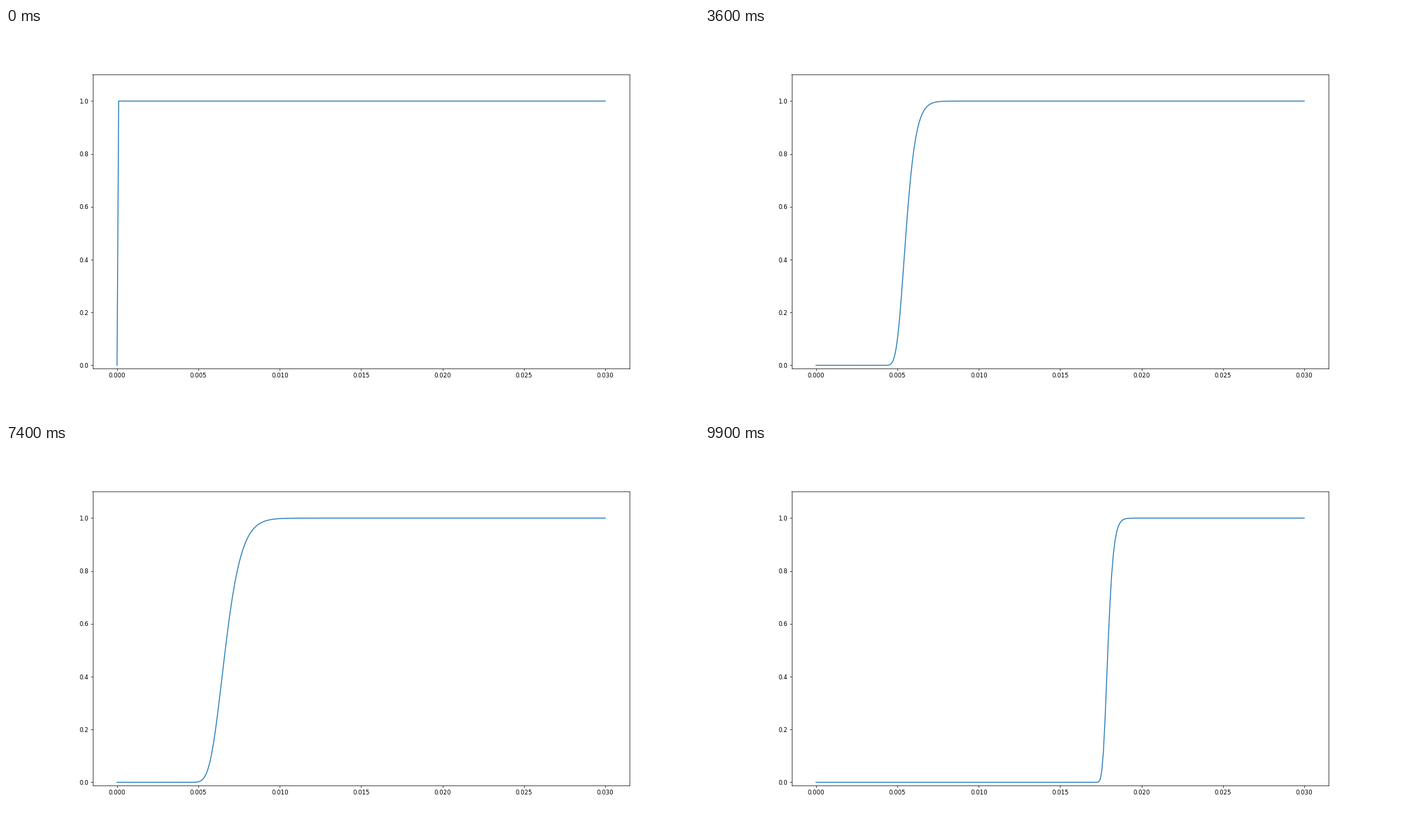
Write a matplotlib script that moves like this. It is 998 by 561 pixels and loops after 10000 ms.

```python
import numpy as np
import matplotlib.pyplot as plt
from matplotlib.animation import FuncAnimation

W, H, DPI = 998, 561, 62.375
FRAMES, INTERVAL = 100, 100
N = 300
JUMP, REIGNITE, SECOND = 12, 77, 82
x = np.linspace(0, 0.03, N)
cell = np.arange(N)


def burn(pos, width):
    """Accumulated reaction around a front; grows steeply behind it."""
    z = np.clip((cell - pos) / width, -14, 30)
    return np.exp(-(0.84 * z + 0.03 * z ** 2))


def first_burn(t):
    """Slow heating from the wall, a quick jump, then a creeping front."""
    if t < JUMP:
        return burn(0.45 + 3.73 * np.sqrt(t), 0.04 + 0.64 * np.sqrt(t))
    pos = 49.25 + 0.268 * (t - 20) - 33.8 * np.exp(-(t - JUMP) / 2.4)
    return burn(pos, np.sqrt(0.57 * max(t - 13.6, 1)))


def second_burn(t):
    """Front that ignites ahead, burns back a little and runs on."""
    s = t - SECOND
    front = burn(191.15 - 91.77 * np.exp(-s / 8.8),
                 np.sqrt(0.23 * abs(s + 0.2)))
    back = 3.2 * np.exp(0.75 * s + (cell - 65.5) / 11.9)
    return front * back / (front + back)


def remaining(t):
    total = first_burn(t)
    if t > REIGNITE:
        total = total + second_burn(t)
    return np.exp(-total)


plt.rcParams["font.family"] = "DejaVu Sans"
fig, ax = plt.subplots(figsize=(W / DPI, (H + 0.01) / DPI), dpi=DPI)
fig.subplots_adjust(left=0.125, right=0.9, bottom=0.125, top=0.88)
line, = ax.plot(x, remaining(0), color="#1f77b4", lw=1.5)
ax.set_xlim(-0.0015, 0.0315)
ax.set_ylim(-0.0115, 1.1)
ax.spines["top"].set_snap(False)


def update(i):
    line.set_ydata(remaining(i))
    return line,


anim = FuncAnimation(fig, update, frames=FRAMES, interval=INTERVAL,
                     repeat=True, repeat_delay=0)
plt.show()
```
